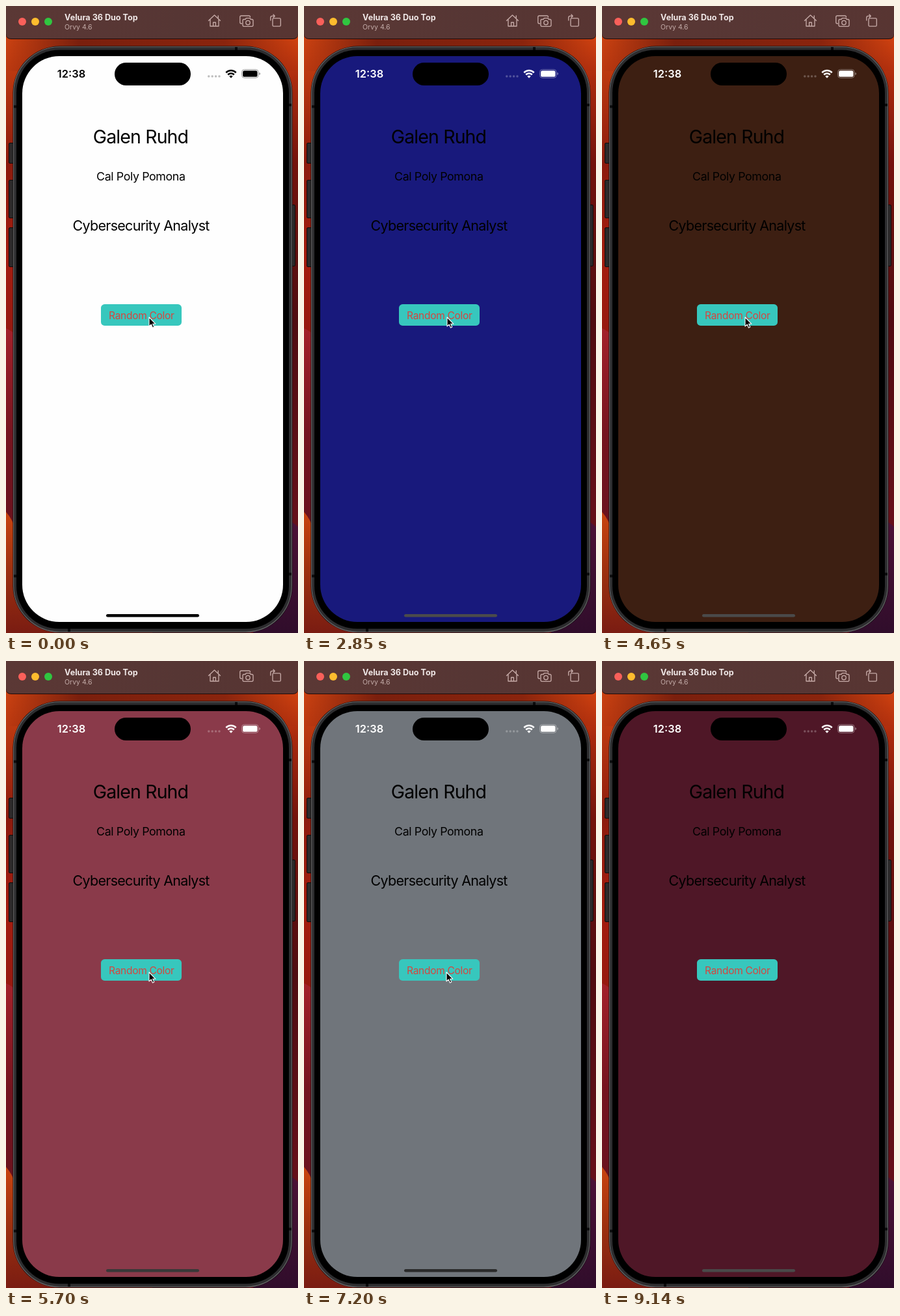
An HTML page for the animation above (9290 ms loop, 449 by 963 pixels).

```html
<!DOCTYPE html>
<html lang="en">
<head>
<meta charset="utf-8">
<title>Random Color</title>
<style>
  html, body { margin: 0; width: 100%; height: 100%; overflow: hidden; background: #000; }
  svg { display: block; width: 449px; height: 963px; }
  text { font-family: Inter, "Open Sans", sans-serif; font-optical-sizing: none; }
  .mid { text-anchor: middle; }
  .line { fill: none; stroke: #c6aaa7; stroke-width: 1.35; stroke-linecap: round; stroke-linejoin: round; }
  .side { fill: #2c2a2b; stroke: #100c0c; }
</style>
</head>
<body>
<svg viewBox="0 0 449 963">
  <defs>
    <linearGradient id="left" x2="0" y2="1">
      <stop offset=".05" stop-color="#cb4211"/>
      <stop offset=".13" stop-color="#b4340f"/>
      <stop offset=".25" stop-color="#8c1b0d"/>
      <stop offset=".4" stop-color="#a51d0f"/>
      <stop offset=".52" stop-color="#96190f"/>
    </linearGradient>
    <linearGradient id="lower" x2="0" y2="1">
      <stop offset="0" stop-color="#a3212a"/>
      <stop offset=".35" stop-color="#75141f"/>
      <stop offset="1" stop-color="#5c101c"/>
    </linearGradient>
    <linearGradient id="ember" x2="0" y2="1">
      <stop offset="0" stop-color="#c9440f"/>
      <stop offset=".5" stop-color="#9c300f"/>
      <stop offset="1" stop-color="#7a1c12"/>
    </linearGradient>
    <linearGradient id="right" x2="0" y2="1">
      <stop offset=".05" stop-color="#d14310"/>
      <stop offset=".12" stop-color="#a92a0d"/>
      <stop offset=".25" stop-color="#74130c"/>
      <stop offset=".5" stop-color="#500d11"/>
      <stop offset=".8" stop-color="#651019"/>
    </linearGradient>
    <linearGradient id="plum" x2="0" y2="1">
      <stop offset="0" stop-color="#4d1236"/>
      <stop offset="1" stop-color="#300d2b"/>
    </linearGradient>
    <linearGradient id="top">
      <stop offset="0" stop-color="#7a1f0d" stop-opacity="0"/>
      <stop offset=".25" stop-color="#7a1f0d"/>
      <stop offset=".75" stop-color="#8a240d"/>
      <stop offset="1" stop-color="#8a240d" stop-opacity="0"/>
    </linearGradient>
    <linearGradient id="bar">
      <stop offset="0" stop-color="#5b3835"/>
      <stop offset=".6" stop-color="#563634"/>
      <stop offset="1" stop-color="#583532"/>
    </linearGradient>
  </defs>

  <!-- wallpaper -->
  <rect width="225" height="963" fill="url(#left)"/>
  <rect x="225" width="224" height="963" fill="url(#right)"/>
  <rect y="50" width="449" height="50" fill="url(#top)"/>
  <path d="M0 495Q9 499 16 506V963H0Z" fill="url(#lower)"/>
  <path d="M0 777Q9 787 16 806L90 963H0Z" fill="url(#ember)"/>
  <path d="M432 789Q442 793 449 800V963H380Z" fill="url(#plum)"/>

  <!-- window bar -->
  <path d="M0 0H449V43Q449 51 441 51H8Q0 51 0 43Z" fill="#200b09"/>
  <path d="M0 0H449V42Q449 50 441 50H8Q0 50 0 42Z" fill="url(#bar)"/>
  <circle cx="25" cy="24" r="6" fill="#fa605a"/>
  <circle cx="45" cy="24" r="6" fill="#fdbc2e"/>
  <circle cx="65" cy="24" r="6" fill="#30c640"/>
  <text x="90" y="22" font-size="12.6" font-weight="700" fill="#f0e8e7">Velura 36 Duo Top</text>
  <text x="90" y="36" font-size="10.5" fill="#c3aba8">Orvy 4.6</text>
  <g class="line">
    <path d="M311.5 22.5L320.5 14L329.5 22.5M314 20.8V31H327V20.8M318.6 31V25.2H322.4V31M326.3 15V19"/>
    <path d="M362.5 27H361.8Q359.8 27 359.8 25V17Q359.8 15 361.8 15H373.5Q375.5 15 375.5 17"/>
    <path d="M366 20.5H368L369.3 18.6H375L376.3 20.5H378Q380 20.5 380 22.5V29.3Q380 31.3 378 31.3H366Q364 31.3 364 29.3V22.5Q364 20.5 366 20.5Z"/>
    <circle cx="372" cy="25.6" r="3.2"/>
    <rect x="410" y="18.8" width="12.3" height="12.3" rx="1.6"/>
    <path d="M406.8 22V18Q406.8 15.4 409.4 15.4H413M411 13.1L413.3 15.4L411 17.7"/>
  </g>

  <!-- phone body -->
  <g class="side">
    <rect x="4.5" y="210.5" width="10" height="31" rx="1.5"/>
    <rect x="4.5" y="267.5" width="10" height="58" rx="1.5"/>
    <rect x="4.5" y="340.5" width="10" height="60" rx="1.5"/>
    <rect x="435" y="305.5" width="9.5" height="94" rx="1.5"/>
  </g>
  <rect x="10.5" y="61.5" width="430" height="901" rx="72" fill="#0c0a0a"/>
  <rect x="11.7" y="62.7" width="427.6" height="898.6" rx="71" fill="#2d2d2f" stroke="#68686a" stroke-width="1.1"/>
  <path d="M12 154.5H17M434 152H439M354 63V68M97 955V961M12 875.5H17M434 872.5H439" stroke="#0b0b0c" stroke-width="4"/>
  <rect x="16" y="67.5" width="419" height="889" rx="66" fill="#000"/>

  <!-- app screen -->
  <rect id="screen" x="25" y="77" width="401" height="869" rx="57"/>
  <rect x="167" y="87" width="117" height="35" rx="17.5" fill="#000"/>
  <g id="status">
    <text class="mid" x="100.5" y="110" font-size="16.4" font-weight="600">12:38</text>
    <g opacity=".25">
      <circle cx="311.8" cy="108" r="1.75"/>
      <circle cx="317.2" cy="108" r="1.75"/>
      <circle cx="322.6" cy="108" r="1.75"/>
      <circle cx="328" cy="108" r="1.75"/>
    </g>
    <path d="M338.3 102.3A10.9 10.9 0 0 1 353.7 102.3M341.2 105.5A6.8 6.8 0 0 1 350.8 105.5" fill="none" stroke="currentColor" stroke-width="2.5"/>
    <path d="M346 110.8L343.3 108A3.8 3.8 0 0 1 348.7 108Z"/>
    <g opacity=".4">
      <rect x="362.5" y="97.6" width="25.6" height="12.8" rx="4" fill="none" stroke="currentColor"/>
      <path d="M389.3 102Q391.2 102.6 391.2 104T389.3 106Z"/>
    </g>
    <rect x="364.1" y="99.2" width="22.4" height="9.6" rx="2.6"/>
  </g>
  <g class="mid">
    <text x="207" y="211" font-size="28.5" letter-spacing="-.031em">Galen Ruhd</text>
    <text x="207.3" y="268" font-size="17.8" letter-spacing="-.022em">Cal Poly Pomona</text>
    <text x="207.6" y="345" font-size="21.5" letter-spacing="-.033em">Cybersecurity Analyst</text>
  </g>
  <rect x="146" y="458" width="124" height="33" rx="5.6" fill="#37c7bd"/>
  <text class="mid" x="208.3" y="480.7" font-size="15.5" letter-spacing="-.019em" fill="#d6453f">Random Color</text>
  <rect id="home" x="154" y="934" width="143" height="4.6" rx="2.3"/>

  <path id="cursor" d="M0 0V14L3.2 11.1L5.5 16.2L7.8 15.1L5.6 10.2H9.8Z" fill="#000" stroke="#fff" stroke-width="1.1" stroke-linejoin="round"/>
</svg>
<script>
  const LOOP = 9290, STEP = 150;
  const $ = id => document.getElementById(id);
  const screen = $("screen"), status = $("status"), home = $("home"), cursor = $("cursor");

  const shades = [
    [0, "fefefe"], [300, "6b8f4a"], [900, "2f5f6e"], [1350, "51242b"],
    [1950, "6a4a8c"], [2400, "3d6b3a"], [2850, "18197c"], [3300, "7a5a2c"],
    [3900, "2a6a70"], [4500, "3d1f12"], [4950, "5a7a3c"], [5400, "8a3a4a"],
    [5850, "2c4a7c"], [6150, "733b7a"], [6600, "3e6a5c"], [7050, "70757b"],
    [7500, "4f1727"]
  ];

  // time, x, y of the pointer tip
  const trail = [
    [0, 220, 478], [7050, 220, 478], [7200, 219, 478], [7500, 219, 478],
    [7950, 238, 512], [8390, 355, 650], [8540, 420, 735], [8690, 460, 830],
    [8840, 437, 954], [8990, 441, 957], [9140, 470, 990], [LOOP, 470, 990]
  ];

  const clamp = (v, lo, hi) => Math.min(hi, Math.max(lo, v));
  const gray = v => { const n = Math.round(v); return `rgb(${n},${n},${n})`; };
  const lastAt = (list, t) => list.findLastIndex(k => k[0] <= t);

  // The pauses run on a 150 ms beat that slips by 10 ms near the end.
  function beat(t) {
    const slip = t < 8390 ? 0 : 10;
    return Math.floor((t + slip) / STEP) * STEP - slip;
  }

  function luma(hex) {
    const n = parseInt(hex, 16);
    return 0.3 * (n >> 16) + 0.59 * (n >> 8 & 255) + 0.11 * (n & 255);
  }

  function pointer(t) {
    const i = Math.min(lastAt(trail, t), trail.length - 2);
    const [a, x, y] = trail[i], [b, u, v] = trail[i + 1];
    const p = (t - a) / (b - a);
    return [x + (u - x) * p, y + (v - y) * p];
  }

  function draw(time) {
    const t = beat(time % LOOP);
    const hex = shades[lastAt(shades, t)][1];
    const ink = gray(255 * clamp((t - 150) / 450, 0, 1));
    screen.setAttribute("fill", "#" + hex);
    status.setAttribute("fill", ink);
    status.setAttribute("color", ink);
    home.setAttribute("fill", gray(clamp(90 - 0.41 * luma(hex), 0, 90)));
    cursor.setAttribute("transform", `translate(${pointer(t)})`);
  }

  const start = performance.now();
  function tick() {
    draw(performance.now() - start);
    requestAnimationFrame(tick);
  }
  tick();
</script>
</body>
</html>
```
